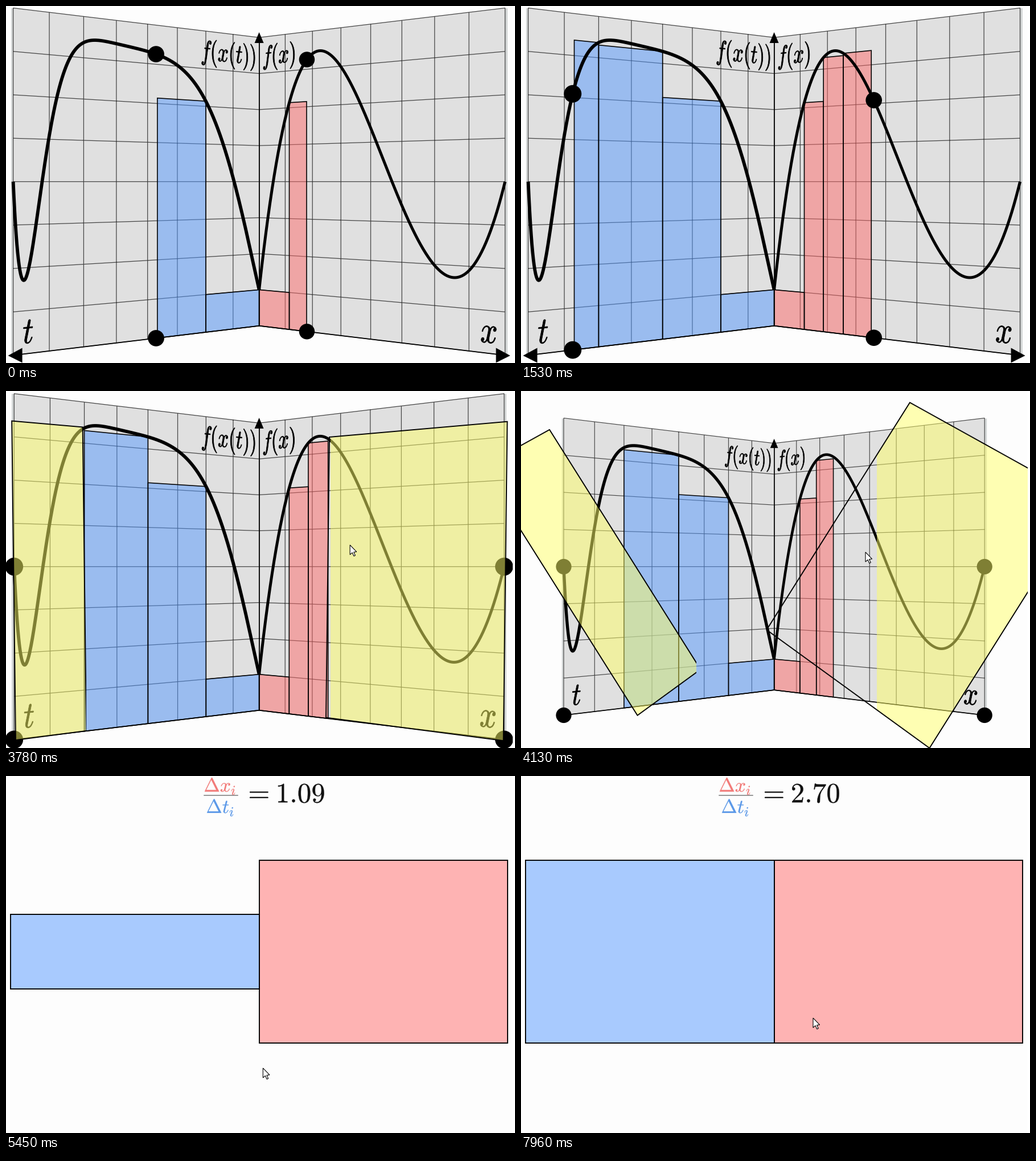
Recreate the animation shown at these times as a matplotlib script. Size 894x627 px, loop 8000 ms.

```python
import numpy as np
import matplotlib
import matplotlib.pyplot as plt
from matplotlib.animation import FuncAnimation
from matplotlib.patches import Circle, PathPatch, Polygon, Rectangle
from matplotlib.path import Path
from matplotlib.textpath import TextPath
from matplotlib.transforms import Affine2D

matplotlib.rcParams["mathtext.fontset"] = "cm"

W, H, DPI = 894, 627, 100
LOOP, STEP = 8000, 40
PX = 72 / DPI
CX, CY = 444.6, 308.5        # fold of the two panels
SPAN, DEPTH, ROW = 358.6, 0.1698, 63.3
TEXT_SPAN = 530              # unforeshortened panel width, for lettering
BLUE, RED, YELLOW = (np.array(c) / 255 for c in
                     [(85, 153, 255), (255, 107, 107), (255, 255, 104)])
BG = "#fdfdfd"

fig = plt.figure(figsize=(W / DPI, H / DPI), dpi=DPI, facecolor=BG)
ax = fig.add_axes([0, 0, 1, 1])
ax.axis("off")
ax.set_autoscale_on(False)
ax.set_xlim(0, W)
ax.set_ylim(H, 0)

zoom = Affine2D()
scene = zoom + ax.transData
strokes = []                 # (artist, width) pairs that thin out with the zoom


def ease(ms, start, end):
    """Sigmoid ramp from 0 to 1."""
    q = np.clip((ms - start) / (end - start), 0, 1)
    low = 1 / (1 + np.exp(5))
    return np.clip((1 / (1 + np.exp(5 - 10 * q)) - low) / (1 - 2 * low), 0, 1)


def mix(a, b, p):
    return a + (b - a) * p


def x_of(t):
    return (0.5004 * t + 0.823 * t**2 - 2.164 * t**3
            + 1.1393 * t**5 + 0.7013 * t**6)


def f(x):
    return ((x - 1) * (x - 0.586)
            * (72.55 * (x - 0.07056) - 3.3 * x * (x - 0.823)))


def proj(side, u, v):
    """Panel coordinates (u in 0..1, v in -4..4) to pixels."""
    d = 1 - DEPTH * np.asarray(u, float)
    return CX + side * SPAN * u / d, CY - v * ROW / d


def corners(side, a, b, top):
    x, y = proj(side, np.array([a, a, b, b]), np.array([-4, top, top, -4]))
    return np.column_stack([x, y])


def stroke(x, y, width, color, z):
    line, = ax.plot(x, y, color=color, lw=width * PX, zorder=z,
                    transform=scene, solid_capstyle="butt")
    strokes.append((line, width))


def shape(points, z, **kw):
    return ax.add_patch(Polygon(points, closed=True, zorder=z, **kw))


def ink_left(path):
    return path.vertices[path.codes != Path.CLOSEPOLY, 0].min()


def panel_label(side, text, size, u0, base):
    path = TextPath((0, 0), text, size=size)
    a, b = path.vertices.T
    x, y = proj(side, u0 + side * (a - ink_left(path)) / TEXT_SPAN,
                (base + b) / ROW)
    patch = PathPatch(Path(np.column_stack([x, y]), path.codes),
                      fc="black", ec="black", zorder=6, transform=scene)
    ax.add_patch(patch)
    strokes.append((patch, 0.8))


def flat_path(text, size, x, y, by_ink=True):
    path = TextPath((0, 0), text, size=size)
    left = ink_left(path) if by_ink else 0
    return Path(path.vertices * [1, -1] + [x - left, y], path.codes)


def title_part(text, size, x, y, color, by_ink=True):
    return ax.add_patch(PathPatch(flat_path(text, size, x, y, by_ink),
                                  fc=color, ec=color, lw=0.3 * PX, zorder=15))


# Panels, grid and curves
nan = np.nan
s = np.linspace(0, 1, 400)
bars, dots = {}, {}
arrows = []
for side in (-1, 1):
    edge_x, edge_y = proj(side, np.array([1, 1]), np.array([-4, 4]))
    stroke(edge_x, edge_y, 8, "#d3d6d6", 1)
    shape(corners(side, 0, 1, 4), 1.5, fc="#e0e0e0", lw=0, transform=scene)
    gu, gv = [], []
    for i in range(9):
        gu += [i / 8, i / 8, nan, 0, 1, nan]
        gv += [-4, 4, nan, i - 4, i - 4, nan]
    stroke(*proj(side, np.array(gu), np.array(gv)), 1.25, "#444444", 2)
    stroke(*proj(side, np.array([0, 1]), np.array([-4, -4])), 1.8, "black", 4)

    bars[side] = []
    for i in range(4):
        bar = shape(np.zeros((4, 2)), 3, lw=0, transform=scene)
        rim = shape(np.zeros((4, 2)), 3.5, fill=False, ec="black",
                    lw=1.6 * PX, transform=scene)
        strokes.append((rim, 1.6))
        bars[side].append((bar, rim))

    height = f(x_of(s)) if side < 0 else f(s)
    stroke(*proj(side, s, height), 5.8 if side < 0 else 5, "black", 7)
    tip = [(441, 305.5), (416, 292), (416, 318)]
    arrows.append(shape([(CX + side * x, CY + y) for x, y in tip], 5,
                        fc="black", lw=0, transform=scene))
    dots[side] = [ax.add_patch(Circle((0, 0), 1, fc="black", lw=0, zorder=8,
                                      transform=scene)) for _ in range(2)]

stroke([CX, CX], [CY + 4 * ROW, CY - 255], 1.7, "black", 4)
shape([(CX, 46), (CX - 8, 65), (CX + 8, 65)], 5, fc="black", lw=0,
      transform=scene)
panel_label(-1, "$f(x(t))$", 46.5, 0.2685, 205)
panel_label(1, "$f(x)$", 46.5, 0.0205, 205)
panel_label(-1, "$t$", 55, 0.9653, -238)
panel_label(1, "$x$", 56, 0.918, -238)

veil = ax.add_patch(Rectangle((0, 0), W, H, fc=BG, lw=0, zorder=9))

# Flying rectangles
cards = {}
for side in (-1, 1):
    cards[side] = (shape(np.zeros((4, 2)), 10, lw=0, alpha=0.5),
                   shape(np.zeros((4, 2)), 11, fill=False, ec="black",
                         lw=1.9 * PX))

# Ratio readout
title = [title_part(r"$\Delta x_i$", 34, 349, 27.5, "#f27a78"),
         title_part(r"$\Delta t_i$", 34, 353, 65, "#5a98e8"),
         title_part("$=$", 49, 428, 45.5, "#111111")]
rule, = ax.plot([348, 407], [33.5, 33.5], color="#777777", lw=1.5 * PX,
                zorder=15)
counter = title_part("$1.00$", 49, 473.7, 46.5, "#111111", False)
title += [rule, counter]

POINTER = np.array([(0, 0), (0, 17), (4, 13.4), (6.8, 19.5), (9.3, 18.4),
                    (6.6, 12.5), (11.6, 12)])
pointer = shape(POINTER, 20, fc="white", ec="black", lw=1.1 * PX)
TRACK = np.array([(2850, 642, -8), (3300, 612, 190), (3700, 604, 268),
                  (4130, 605, 283), (4690, 485, 517), (5400, 452, 513),
                  (6330, 440, 513), (7650, 452, 510), (7810, 466, 496),
                  (7960, 513, 425)])
ax.add_patch(Rectangle((890, 0), 4, H, fc="white", lw=0, zorder=30))


def draw_bars(ms, t):
    warm = ease(ms, 2850, 3680)
    for side, color in ((-1, BLUE), (1, RED)):
        to_u = x_of if side > 0 else float
        for i, (bar, rim) in enumerate(bars[side]):
            a, b = i / 4, min((i + 1) / 4, t)
            shown = b > a and not (i == 3 and ms >= 3680)
            bar.set_visible(shown)
            rim.set_visible(shown)
            if shown:
                pts = corners(side, to_u(a), to_u(b), f(x_of(a)))
                bar.set_xy(pts)
                rim.set_xy(pts)
                fill = mix(color, YELLOW, warm) if i == 3 else color
                bar.set_facecolor((*fill, 0.5))


def draw_dots(t):
    for side in (-1, 1):
        u = x_of(t) if side > 0 else t
        for dot, v in zip(dots[side], (f(x_of(t)), -4)):
            dot.center = proj(side, u, v)
            dot.set_radius(13.2 / (1 - DEPTH * u))
    for arrow in arrows:
        arrow.set_visible(t < 1)


def draw_cards(ms, p, ratio):
    cool = ease(ms, 4520, 4780)
    bump = p * (1 - p)
    for side, color in ((-1, BLUE), (1, RED)):
        fill, rim = cards[side]
        for part in (fill, rim):
            part.set_visible(ms >= 3680)
        if ms < 3680:
            continue
        inner = x_of(0.75) if side > 0 else 0.75
        pts = corners(side, inner, 1, f(x_of(0.75)))
        begin = side * (pts[:, 0] - CX) + 1j * pts[:, 1]
        half = 160.5 if side > 0 else 59.5 * ratio
        end = np.array([0, 436.5, 436.5, 0]) + 1j * (
            CY + half * np.array([-1, -1, 1, 1]))
        c0, c1 = begin.mean(), end.mean()
        local = mix(begin - c0, (end - c1) * -1j, p)
        local = local.real * (1 + 0.52 * bump) + 1j * local.imag
        center = mix(c0, c1, p) + (28 - 34j) * bump
        z = center + local * np.exp(0.5j * np.pi * p**1.05)
        pts = np.column_stack([CX + side * z.real, z.imag])
        fill.set_xy(pts)
        rim.set_xy(pts)
        fill.set_facecolor(mix(YELLOW, color, cool))
        # the part next to the fold is hidden behind its panel
        near = 121 + 437 * p - 744 * p * p if side > 0 else 308 - 455 * p
        near = max(near, -6)
        x0 = CX + near if side > 0 else -10
        x1 = W + 10 if side > 0 else CX - near
        window = Rectangle((x0, -10), x1 - x0, H + 20, transform=ax.transData)
        fill.set_clip_path(window)
        if side < 0:
            rim.set_clip_path(window)


def update(n):
    ms = n * STEP + 10
    sweep = 0.4625 + 0.00025 * ms
    p = ease(ms, 3680, 4680)
    ratio = 1 + 1.7 * ease(ms, 4770, 7770)

    size = 1 - 0.384 * p
    zoom.clear().translate(-CX, -CY).scale(size).translate(CX, CY)
    for artist, width in strokes:
        artist.set_linewidth(width * PX * size**0.5)

    draw_bars(ms, min(1.0, sweep - 0.0055))   # bars trail the dots slightly
    draw_dots(min(1.0, sweep))
    draw_cards(ms, p, ratio)
    veil.set_alpha(ease(ms, 4740, 5360))

    counter.set_path(flat_path(f"${ratio:.2f}$", 49, 473.7, 46.5, False))
    for part in title:
        part.set_alpha(ease(ms, 4460, 4720))

    pointer.set_visible(ms >= TRACK[0, 0])
    pointer.set_xy(POINTER + [np.interp(ms, TRACK[:, 0], TRACK[:, k])
                              for k in (1, 2)])
    return []


anim = FuncAnimation(fig, update, frames=LOOP // STEP, interval=STEP,
                     init_func=lambda: update(0), repeat=True, repeat_delay=0,
                     blit=False)
plt.show()
```
